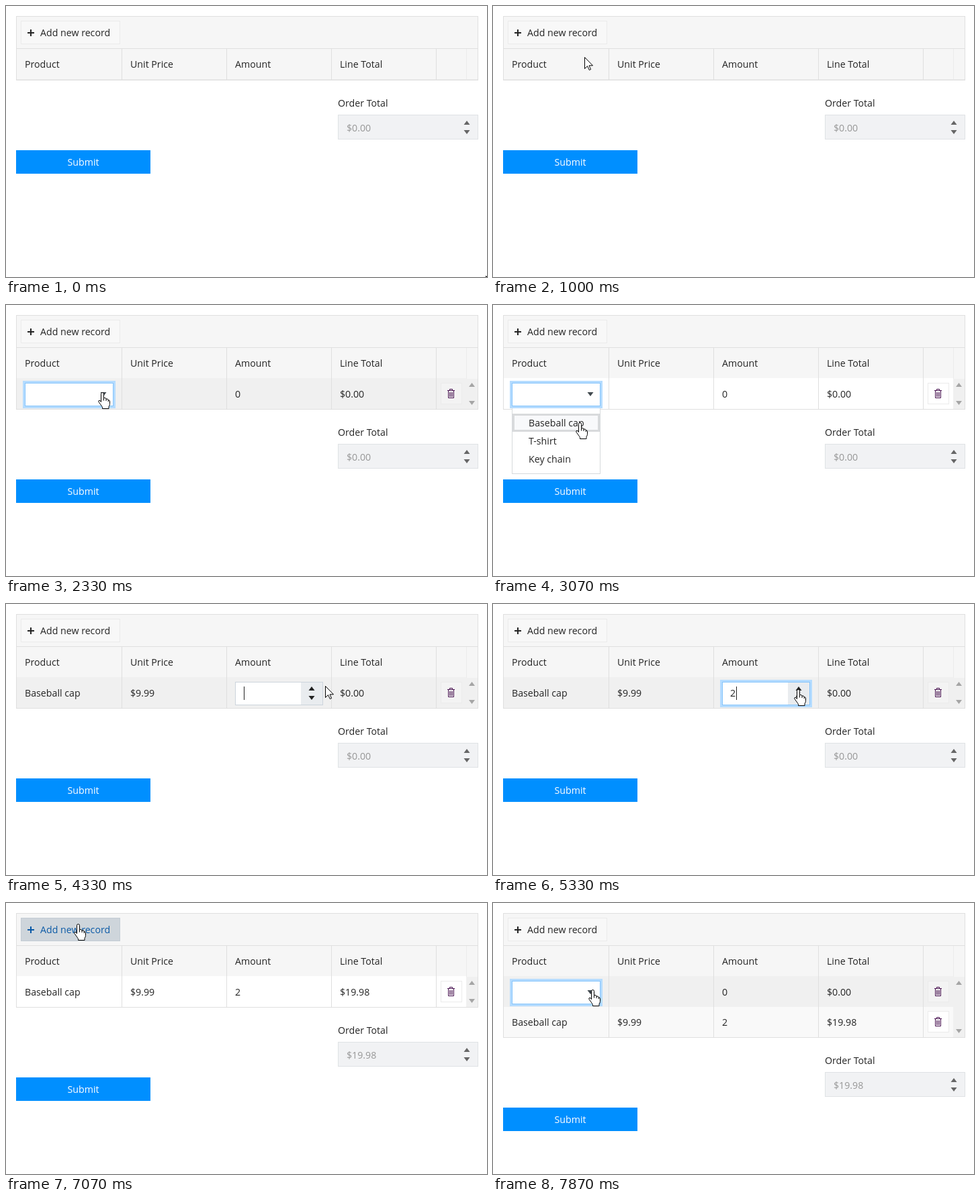
An HTML page that plays this animation: 716 by 404 pixels, repeating every 8 s.

```html
<!DOCTYPE html>
<html lang="en">
<head>
<meta charset="utf-8">
<title>Order form</title>
<style>
  html, body { margin: 0; width: 100%; height: 100%; overflow: hidden; background: #fff; }
  svg { display: block; position: absolute; left: 0; top: 0; }
  text { font: 14.2px "Open Sans", "Noto Sans", sans-serif; white-space: pre; }
</style>
</head>
<body>
<svg width="716" height="404" viewBox="0 0 716 404">
  <defs>
    <clipPath id="drop"><rect x="20" y="154" width="150" height="110"/></clipPath>
  </defs>
  <g id="scene"></g>
  <g id="cursor" fill="#fff" stroke="#000" stroke-linejoin="round"><path id="shape"/></g>
</svg>
<script>
const LOOP = 8000, ROW = 45, TOP = 110;
const LINE = '#dfdfdf', INK = '#242424';

// Moments at which the form changes state.
const AT = {
  add: 1470, focus: 1620, open: 2330, pick: 3330, edit: 4270, editFocus: 4390,
  one: 4800, two: 5000, commit: 5600, addAgain: 7130, focusAgain: 7300
};

// Pointer stops: time, x, y.
const PATH = [
  [0, 714, 402], [40, 714, 402], [870, 145, 89], [1200, 120, 50.5], [1540, 120, 50.5],
  [2270, 143, 130], [2400, 143, 130], [3060, 128.5, 174.5], [3340, 128.5, 174.5],
  [4130, 474.5, 121.5], [4340, 474.5, 121.5], [4740, 455, 125], [5290, 455, 125],
  [5700, 428, 200], [5960, 428, 200], [6200, 419.5, 201.5], [6800, 112, 39],
  [6930, 107, 30.5], [7140, 107, 30.5], [7530, 163, 118], [7640, 163, 118],
  [7870, 148, 129], [8000, 148, 129]
];

const ARROW = 'M0 0V17l4-4 2.8 6 2.3-1-2.6-5.7H12Z';
const HAND = 'M-2 2a2 2 0 0 1 4 0V8q3.2-.8 3.5 1.5q3-.5 3.2 1.5q2.3 0 2.3 2.5V17' +
  'q0 2-1.5 4v3H0v-2q-1-2-3-4.5L-5.5 14q-.8-2 1-2.2q1.5 0 2.5 2.2Z' +
  'M2 8v4M5.5 9.5V12.5M8.7 11v2.5';

const ease = p => (1 - Math.cos(Math.PI * p)) / 2;
const clamp = p => Math.max(0, Math.min(1, p));
const during = (t, a, b) => t >= a && t < b;
const inside = (p, x, y, w, h) => p.x >= x && p.x < x + w && p.y >= y && p.y < y + h;

const rect = (x, y, w, h, fill) =>
  `<rect x="${x}" y="${y}" width="${w}" height="${h}" fill="${fill}"/>`;
const box = (x, y, w, h, fill, stroke, width = 1) =>
  `<rect x="${x + width / 2}" y="${y + width / 2}" width="${w - width}" height="${h - width}"` +
  ` fill="${fill}" stroke="${stroke}" stroke-width="${width}"/>`;
const text = (x, y, s, fill = INK, anchor = 'start') =>
  `<text x="${x}" y="${y}" fill="${fill}" text-anchor="${anchor}">${s}</text>`;
const up = (x, y, fill) => `<path d="M${x - 4.5} ${y + 3}h9l-4.5-6Z" fill="${fill}"/>`;
const down = (x, y, fill) => `<path d="M${x - 4.5} ${y - 3}h9l-4.5 6Z" fill="${fill}"/>`;
const ring = (x, y, w, h) => box(x - 3, y - 3, w + 6, h + 6, 'none', '#b5dcff', 3);

function pointer(t) {
  const i = PATH.findIndex(k => k[0] > t);
  const [t0, x0, y0] = PATH[i - 1], [t1, x1, y1] = PATH[i];
  const p = ease((t - t0) / (t1 - t0));
  return { x: x0 + (x1 - x0) * p, y: y0 + (y1 - y0) * p };
}

function addButton(hot, glow) {
  const ink = hot ? '#0b5aa6' : INK;
  return (glow ? box(20, 20, 152, 39, 'none', '#dcebf8', 2) : '') +
    box(22, 22, 148, 35, hot ? '#ced5db' : '#f8f8f8', hot ? '#c3ccd4' : '#ebebeb') +
    rect(32, 39, 10, 2, ink) + rect(36, 35, 2, 10, ink) +
    text(51, 45, 'Add new record', ink);
}

function header() {
  const names = ['Product', 'Unit Price', 'Amount', 'Line Total'];
  return rect(15, 15, 688, 96, '#f6f6f6') + rect(15, 63, 688, 1, LINE) +
    names.map((s, i) => text([28, 185, 341, 497][i], 92, s)).join('') +
    rect(685, 64, 1, 46, '#ececec');
}

function trash(y, hot) {
  return box(647, y + 6, 32, 32, hot ? '#f3f3f3' : '#fff', '#ebebeb') +
    `<g transform="translate(657 ${y + 15})" fill="none" stroke="#4a1552">` +
    '<path d="M0 2.5h11M3.5 2.5v-2h4v2M1.5 3v10.5h8V3M3.5 5v7M5.5 5v7M7.5 5v7"/></g>';
}

function dropdown(focused) {
  return (focused ? ring(28, 116, 132, 35) : '') +
    box(28, 116, 132, 35, '#fff', focused ? '#83c3fb' : '#ccd4dc') + down(145, 133, '#424a50');
}

function numeric(value, focused, caret) {
  return (focused ? ring(341, 116, 131, 35) : '') +
    box(341, 116, 131, 35, '#fff', focused ? '#83c3fb' : '#ccd4dc') +
    rect(439, 117, 32, 33, '#e9ecef') + up(455, 126, '#222') + down(455, 140, '#222') +
    text(353, 138, value) + (caret ? rect(value ? 362 : 354, 123, 1, 20, '#222') : '');
}

function popup(shown, p) {
  const items = ['Baseball cap', 'T-shirt', 'Key chain'];
  const hot = items.findIndex((s, i) => inside(p, 29, 162 + 27 * i, 130, 27));
  return `<g clip-path="url(#drop)"><g transform="translate(0 ${-99 * (1 - shown)})">` +
    box(28, 152, 132, 100, '#fff', '#d6d9dc') +
    (hot > 0 ? rect(29, 162 + 27 * hot, 130, 27, '#f6f8fa') : '') +
    box(29, 162, 130, 27, hot === 0 ? '#f8f9fb' : '#fff', '#d8dadc', 3) +
    items.map((s, i) => text(53, 181 + 27 * i, s)).join('') + '</g></g>';
}

function footer(dy, total) {
  return text(494, 150 + dy, 'Order Total') +
    box(494, 162 + dy, 209, 37, '#f1f2f4', '#dfe2e5') + text(507, 187 + dy, total, '#979797') +
    up(686, 174 + dy, '#666') + down(686, 188 + dy, '#666') +
    rect(15, 215 + dy, 200, 35, '#008fff') + text(115, 238 + dy, 'Submit', '#fff', 'middle');
}

function draw(t) {
  const p = pointer(t);
  const picked = t >= AT.pick, done = t >= AT.commit;
  const editing = during(t, AT.edit, AT.commit);
  const choosing = during(t, AT.add, AT.pick) || t >= AT.addAgain;
  const rows = [];
  if (t >= AT.add) rows.push([
    picked ? 'Baseball cap' : '', picked ? '$9.99' : '',
    editing ? '' : done ? '2' : '0', done ? '$19.98' : '$0.00'
  ]);
  if (t >= AT.addAgain) rows.unshift(['', '', '0', '$0.00']);

  const bottom = TOP + rows.length * ROW;
  const overButton = inside(p, 22, 22, 148, 35);
  let out = header() + addButton(overButton, during(t, AT.add, AT.focus));

  rows.forEach((cells, i) => {
    const y = TOP + i * ROW;
    const hot = inside(p, 16, y, 669, ROW);
    out += rect(16, y - (i ? 0 : 1), 669, ROW + (i ? 0 : 1), hot ? '#f0f0f0' : i ? '#f9f9f9' : '#fff') +
      cells.map((s, c) => text([28, 185, 341, 497][c], y + 28, s)).join('') + trash(y, hot);
  });
  if (rows.length) {
    out += rect(685, TOP, 17, bottom - TOP, '#f0f0f0') +
      up(693.5, TOP + 9, '#a5a5a5') + down(693.5, bottom - 9, '#a5a5a5');
  } else {
    out += rect(15, 109, 688, 1, '#ebebeb');
  }
  for (const x of [172, 328, 484, 640]) out += rect(x, 64, 1, bottom - 64, LINE);
  out += box(15, 15, 688, bottom - 14, 'none', LINE) +
    footer(rows.length * ROW, done ? '$19.98' : '$0.00');

  if (choosing) out += dropdown(during(t, AT.focus, AT.pick) || t >= AT.focusAgain);
  if (editing) {
    const value = t >= AT.two ? '2' : t >= AT.one ? '1' : '';
    out += numeric(value, t >= AT.editFocus, (t - AT.edit) % 1060 < 530);
  }
  const shown = ease(clamp((t - AT.open) / 200)) - ease(clamp((t - AT.pick) / 130));
  if (shown > 0) out += popup(shown, p);

  const hand = overButton ||
    choosing && inside(p, 28, 116, 132, 35) ||
    editing && inside(p, 439, 116, 33, 35) ||
    shown > 0 && inside(p, 28, 152, 132, 100);
  return { out, p, hand };
}

const scene = document.getElementById('scene');
const cursor = document.getElementById('cursor');
const shape = document.getElementById('shape');
let last = '';

function tick(now) {
  const { out, p, hand } = draw((now - start) % LOOP);
  if (out !== last) scene.innerHTML = last = out;
  shape.setAttribute('d', hand ? HAND : ARROW);
  cursor.setAttribute('transform', `translate(${Math.round(p.x) + .5} ${Math.round(p.y) + .5})`);
  requestAnimationFrame(tick);
}

const start = performance.now();
tick(start);
</script>
</body>
</html>
```
